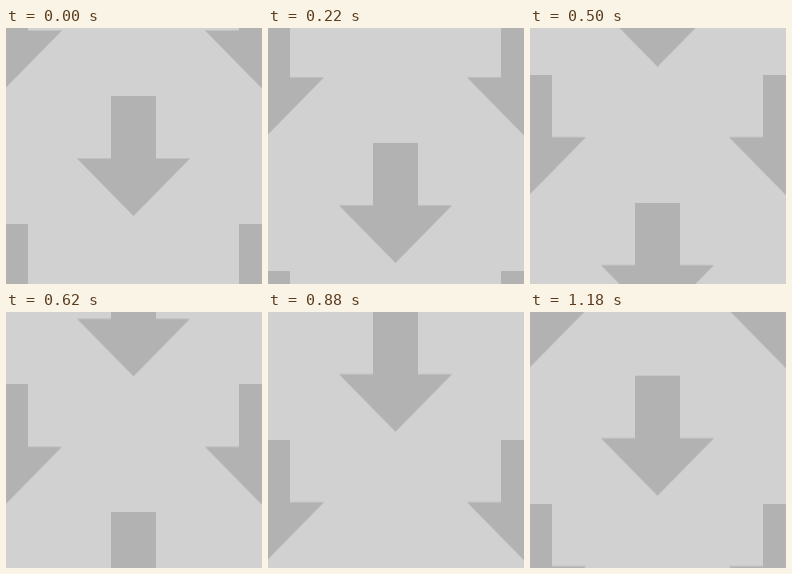
Write an HTML page without scripts that moves like this. It is 256x256 px and loops after 1200 ms.

```html
<!DOCTYPE html>
<html lang="en">
<head>
<meta charset="utf-8">
<title>Falling arrows</title>
<style>
  html, body {
    margin: 0;
    height: 100%;
    overflow: hidden;
    background: #d1d1d1;
  }
  svg {
    display: block;
    width: 100%;
    height: 100%;
  }
  /* The small negative delay keeps each step clear of its boundary. */
  .fall {
    fill: #b2b2b2;
    animation: fall 1200ms steps(60) -2ms infinite;
  }
  @keyframes fall {
    from { transform: translateY(0); }
    to { transform: translateY(256px); }
  }
</style>
</head>
<body>
<svg viewBox="0 0 256 256">
  <defs>
    <path id="arrow" d="M105 68h45v62.5h34L127.5 188 71 130.5h34z"/>
    <g id="row">
      <use href="#arrow"/>
      <use href="#arrow" x="-128" y="-128"/>
      <use href="#arrow" x="128" y="-128"/>
    </g>
  </defs>
  <g class="fall">
    <use href="#row" y="256"/>
    <use href="#row"/>
    <use href="#row" y="-256"/>
  </g>
</svg>
</body>
</html>
```
